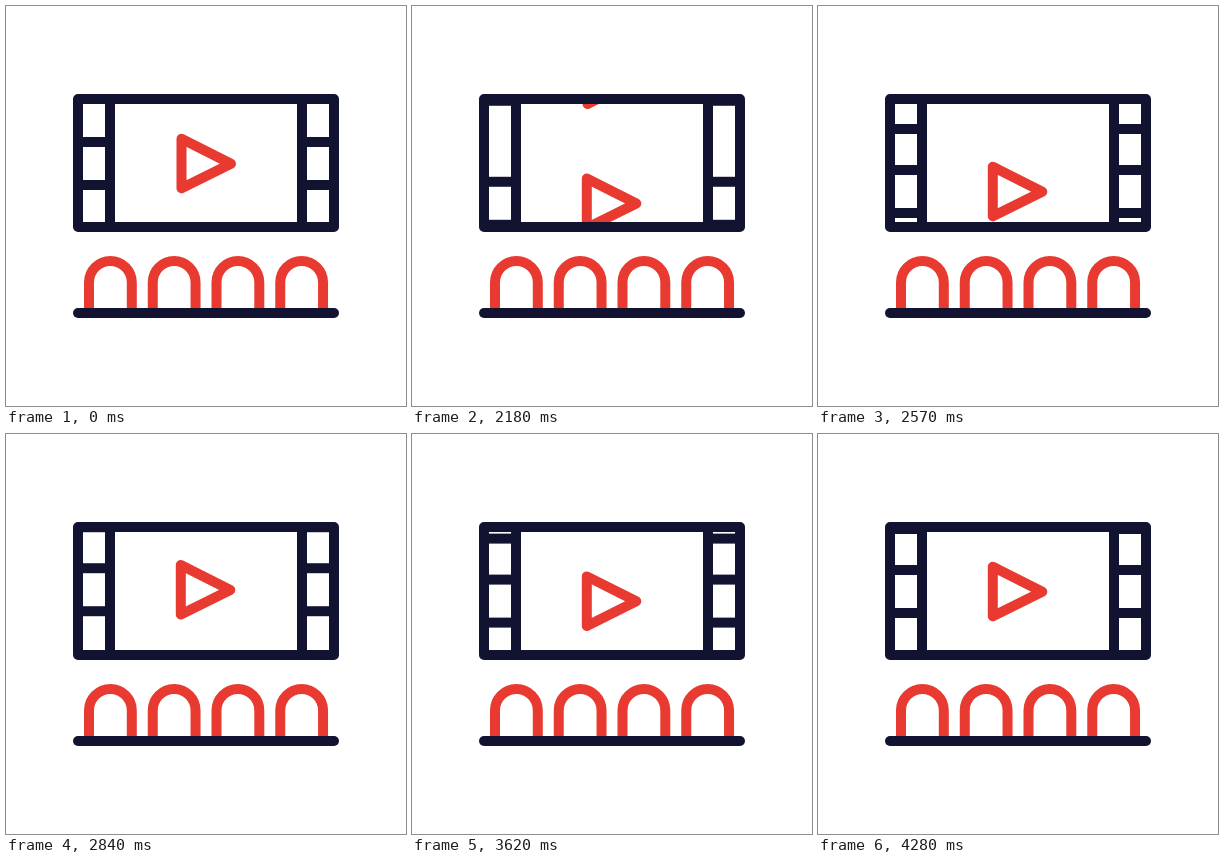
Animation, 400 px wide and 400 px high, one loop 4.46 s. Source, as an HTML page with a canvas:

```html
<!DOCTYPE html>
<html lang="en">
<head>
<meta charset="utf-8">
<title>Cinema</title>
<style>
  html, body { margin: 0; width: 100%; height: 100%; overflow: hidden; background: #fff; }
  canvas { display: block; width: 400px; height: 400px; }
</style>
</head>
<body>
<canvas id="stage" width="400" height="400"></canvas>
<script>
const ctx = document.getElementById("stage").getContext("2d");
const NAVY = "#121331", RED = "#e83a30";
const LOOP = 4460, START = 2000, STEP = 30, LAST_STEP = 76;
const PITCH = 124; // distance between film cells

// Film travel: [step, distance, speed]; overshoots, swings back, settles.
const TRAVEL = [
  [0, 0, 8], [1, 9, 10], [10, 146.5, 12], [19, 220, 4.6],
  [43, 263, 0], [55, 237.9, 0], [76, 2 * PITCH, 0]
];

function travelAt(step) {
  let i = 1;
  while (i < TRAVEL.length - 1 && step > TRAVEL[i][0]) i++;
  const [s0, d0, v0] = TRAVEL[i - 1], [s1, d1, v1] = TRAVEL[i];
  const span = s1 - s0, u = (step - s0) / span, w = 1 - u;
  return w * w * (1 + 2 * u) * d0 + u * u * (3 - 2 * u) * d1
    + span * u * w * (w * v0 - u * v1);
}

function line(x0, y0, x1, y1) {
  ctx.beginPath();
  ctx.moveTo(x0, y0);
  ctx.lineTo(x1, y1);
  ctx.stroke();
}

function drawCell(index, dy) {
  const bars = index === 1 ? [136, 179, 219] : [136, 179];
  ctx.strokeStyle = NAVY;
  for (const y of bars) {
    line(72, y + dy, 104, y + dy);
    line(296, y + dy, 328, y + dy);
  }
  const x = index === 0 ? 175.5 : 174.8;
  ctx.strokeStyle = RED;
  ctx.beginPath();
  ctx.moveTo(x, 132.8 + dy);
  ctx.lineTo(x + 49.5, 157.7 + dy);
  ctx.lineTo(x, 182.3 + dy);
  ctx.closePath();
  ctx.stroke();
}

function drawSeats() {
  const radius = 21.4;
  ctx.strokeStyle = RED;
  ctx.lineCap = "butt";
  for (let i = 0; i < 4; i++) {
    const x = 104.4 + i * 63.75;
    ctx.beginPath();
    ctx.moveTo(x - radius, 305);
    ctx.arc(x, 276.4, radius, Math.PI, 0);
    ctx.lineTo(x + radius, 305);
    ctx.stroke();
  }
  ctx.strokeStyle = NAVY;
  ctx.lineCap = "round";
  line(72, 307, 328, 307);
}

function draw(time) {
  const step = Math.min(LAST_STEP, Math.max(0, Math.floor((time - START) / STEP)));
  const travel = travelAt(step);
  ctx.fillStyle = "#fff";
  ctx.fillRect(0, 0, 400, 400);
  ctx.lineWidth = 10;
  ctx.lineJoin = "round";
  ctx.lineCap = "butt";

  ctx.save();
  ctx.beginPath();
  ctx.rect(72, 93, 256, 128);
  ctx.clip();
  for (let i = 0; i < 3; i++) drawCell(i, i * PITCH - travel);
  ctx.restore();

  ctx.strokeStyle = NAVY;
  line(104, 93, 104, 221);
  line(296, 93, 296, 221);
  ctx.strokeRect(72, 93, 256, 128);
  drawSeats();
}

const origin = performance.now();
function tick() {
  draw((performance.now() - origin) % LOOP);
  requestAnimationFrame(tick);
}
tick();
</script>
</body>
</html>
```
